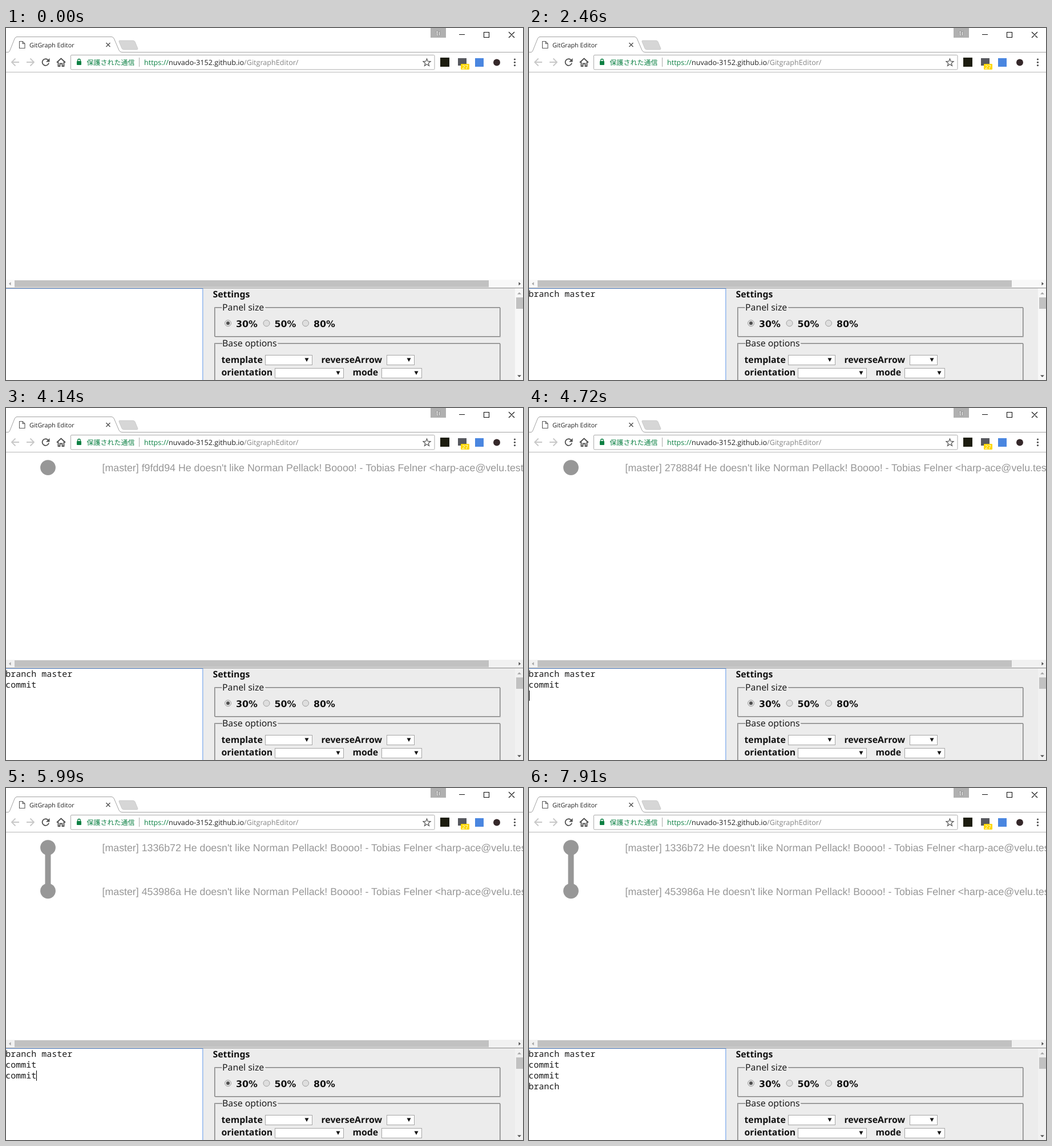
Write an HTML page that moves like this. It is 906 px wide and 618 px high and loops after 8000 ms.

```html
<!DOCTYPE html>
<html lang="ja">
<head>
<meta charset="utf-8">
<title>GitGraph Editor</title>
<style>
html, body { margin: 0; width: 100%; height: 100%; overflow: hidden; background: #fff; }
svg { display: block; width: 906px; height: 618px; }
text { text-rendering: geometricPrecision; white-space: pre; }
.ui { font-family: "Open Sans", "Noto Sans", sans-serif; }
.jp { font: 12px "Noto Sans CJK JP", "Noto Sans CJK", sans-serif; fill: #0b8043; }
.form { font: 15.8px "Noto Sans", sans-serif; fill: #1c1c1c; }
.bold { font-weight: 700; fill: #111; }
.num { font: 700 15.8px "DejaVu Sans", sans-serif; fill: #111; }
.code { font: 15px "Noto Sans Mono", monospace; fill: #1a1a1a; }
.log { font: 17.8px "Liberation Sans", Arial, sans-serif; fill: #979797; }
.icon { fill: none; stroke: #505050; stroke-width: 1.8; }
.pale { stroke: #c8c8c8; }
</style>
</head>
<body>
<svg id="stage" viewBox="0 0 906 618" xmlns="http://www.w3.org/2000/svg">
  <rect width="906" height="618" fill="#fff"/>

  <!-- tab strip and window buttons -->
  <path d="M0 42.5H4Q6 42 7 39L15 19Q16.5 15.5 19 15.5H185Q188 15.5 189.5 19L198 39Q199.5 42.5 203 42.5H906" fill="none" stroke="#a2a2a2"/>
  <path d="M199 22H222Q225 22 226 24L231 36Q231 38 229 38H207Q204 38 203 36L198 24Q197.5 22 199 22Z" fill="#d6d6d6" stroke="#c2c2c2" stroke-width=".7"/>
  <path d="M23.5 23.5H29L33 27.5V35.5H23.5ZM29 23.5V27.5H33" fill="#fff" stroke="#5a5a5a" stroke-width="1.1"/>
  <text class="ui" x="41" y="33.5" font-size="10.8" fill="#222">GitGraph Editor</text>
  <path d="M175.5 26L182.5 33M182.5 26L175.5 33" stroke="#555" stroke-width="1.5"/>
  <rect x="744" width="27" height="17" fill="#b0b0b0"/>
  <text class="ui" x="757.5" y="13" font-size="12" text-anchor="middle" fill="#fff" stroke="#808080" paint-order="stroke">ti</text>
  <path d="M794 11.5H804M837.5 7.5H846.5V16.5H837.5ZM881 7L891 17M891 7L881 17" fill="none" stroke="#111" stroke-width="1.1"/>

  <!-- toolbar -->
  <path d="M0 77.5H906" stroke="#b8b8b8"/>
  <path class="icon pale" d="M23 60H10.5M16.5 53.5L10 60L16.5 66.5M36 60H48.5M42.5 53.5L49 60L42.5 66.5"/>
  <path class="icon" d="M73.5 56A5.8 5.8 0 1 0 75 61.5"/>
  <path d="M76.5 53V59.5H70Z" fill="#505050"/>
  <path class="icon" d="M89 60.5L96.5 53.5L104 60.5M91.5 59.5V67H94.5V62.5H98.5V67H101.5V59.5"/>
  <rect x="113.5" y="47.5" width="637.5" height="25.5" rx="1.5" fill="#fff" stroke="#ababab"/>
  <rect x="124" y="58" width="8" height="7" rx="1" fill="#0b8043"/>
  <path d="M125.7 59V57A2.3 2.5 0 0 1 130.3 57V59" fill="none" stroke="#0b8043" stroke-width="1.3"/>
  <text class="jp" x="141.5" y="64.5">保護された通信</text>
  <path d="M233.5 52V68" stroke="#a8a8a8"/>
  <text class="ui" x="242" y="65" font-size="12.6" fill="#858585"><tspan fill="#0b8043">https://</tspan><tspan fill="#222">nuvado-3152.github.io</tspan>/GitgraphEditor/</text>
  <path id="star" fill="#fff" stroke="#555" stroke-width="1.2"/>
  <rect x="761" y="52" width="16" height="16" fill="#1d1d10"/>
  <rect x="792" y="53" width="15" height="13" fill="#57595f"/>
  <rect x="797" y="63" width="15" height="10" rx="1" fill="#fdd800"/>
  <text class="ui" x="804.5" y="71.5" font-size="9.5" text-anchor="middle" fill="#fff">27</text>
  <rect x="822" y="53" width="15" height="15" fill="#4a86e0"/>
  <circle cx="860" cy="60.5" r="6" fill="#35282a"/>
  <g fill="#505050"><circle cx="891.5" cy="55" r="1.6"/><circle cx="891.5" cy="60.3" r="1.6"/><circle cx="891.5" cy="65.6" r="1.6"/></g>

  <!-- commit graph -->
  <g id="graph">
    <path id="link" d="M73.5 104.6V180.8" stroke="#979797" stroke-width="10"/>
    <g id="top"><circle cx="73.5" cy="104.6" r="13.4" fill="#979797"/><text class="log" x="168.5" y="111"></text></g>
    <g id="low"><circle cx="73.5" cy="180.8" r="13.4" fill="#979797"/><text class="log" x="168.5" y="187.5"></text></g>
  </g>

  <!-- horizontal scrollbar -->
  <rect class="track" y="442" width="906" height="14"/>
  <rect x="15" y="443" width="831" height="12" fill="#c1c1c1"/>
  <path d="M8.5 446V452L5 449Z" fill="#a3a3a3"/>
  <path d="M898.5 446V452L902 449Z" fill="#505050"/>

  <!-- editor -->
  <rect y="457" width="345" height="161" fill="#fff"/>
  <rect x="345" y="457" width="547" height="161" fill="#ececec"/>
  <path d="M0 456.5H906" stroke="#8a8a8a"/>
  <path d="M0 457.5H344.8V618" fill="none" stroke="#79a8ee" stroke-width="1.2"/>
  <g id="code"></g>
  <rect id="caret" width="1" height="18" fill="#000"/>

  <!-- settings -->
  <text class="form bold" x="362.5" y="473">Settings</text>
  <g id="groove" fill="none">
    <path d="M378 490.5H365.5V541.5H865.5V490.5H454M379 553.5H365.5V619M865.5 619V553.5H476"/>
  </g>
  <text class="form" x="379" y="496">Panel size</text>
  <text class="form" x="379" y="559">Base options</text>
  <g id="form"></g>

  <!-- vertical scrollbar -->
  <rect class="track" x="892" y="457" width="14" height="161"/>
  <rect x="894" y="473" width="12" height="20" fill="#c1c1c1"/>
  <path d="M896 467.5H903L899.5 464Z" fill="#a3a3a3"/>
  <path d="M896 609.5H903L899.5 613Z" fill="#505050"/>
</svg>
<script>
const $ = id => document.getElementById(id);
const LOOP = 8000;

function add(parent, tag, attrs, text = '') {
  const el = document.createElementNS('http://www.w3.org/2000/svg', tag);
  for (const key in attrs) el.setAttribute(key, attrs[key]);
  el.textContent = text;
  parent.appendChild(el);
  return el;
}

// five-pointed bookmark star
$('star').setAttribute('d', 'M' + Array.from({ length: 10 }, (_, i) => {
  const r = i % 2 ? 2.9 : 6.8, a = i * Math.PI / 5;
  return `${737.5 + r * Math.sin(a)} ${60.8 - r * Math.cos(a)}`;
}).join('L') + 'Z');

// fieldset frames: a dark line with its lighter copy one pixel inside
const frame = $('groove').firstElementChild;
const shade = frame.cloneNode();
shade.setAttribute('transform', 'translate(1 1)');
shade.setAttribute('stroke', '#b4b4b4');
frame.setAttribute('stroke', '#858585');
$('groove').prepend(shade);

const form = $('form');
[['30%', 389], ['50%', 456.5], ['80%', 525]].forEach(([label, x], i) => {
  add(form, 'circle', { cx: x, cy: 518.3, r: 5.5, fill: '#dedede', stroke: '#a0a0a0' });
  if (!i) add(form, 'circle', { cx: x, cy: 518.3, r: 3, fill: '#505050' });
  add(form, 'text', { class: 'num', x: x + 14, y: 525 }, label);
});

[
  ['template', 377.5, 588, 454.5, 82],
  ['reverseArrow', 552.5, 588, 667.5, 48],
  ['orientation', 377.5, 610, 471.5, 120],
  ['mode', 607.5, 610, 658.5, 70],
].forEach(([label, x, y, left, width]) => {
  const top = y < 600 ? 574.5 : 597.5, end = left + width;
  add(form, 'text', { class: 'form bold', x, y }, label);
  add(form, 'rect', { x: left, y: top, width, height: 17, fill: '#fff', stroke: '#a6a6a6' });
  add(form, 'path', { d: `M${end - 13} ${top + 5}h7l-3.5 6.5z`, fill: '#111' });
});

const lines = [0, 1, 2, 3].map(i => add($('code'), 'text', { class: 'code', x: -0.8, y: 472 + 19 * i }));

// start, end, then the letters added by each evenly spaced key press
const bursts = [
  [500, 1220, ['b', 'r', 'a', 'n', 'ch', ' ']],
  [1490, 2030, ['m', 'a', 's', 'te', 'r']],
  [2760, 3580, ['\n', 'c', 'o', 'm', 'm', 'it']],
  [4720, 5150, ['\n', 'c', 'o', 'mm']],
  [5450, 5450, ['it']],
  [6690, 6930, ['\n', 'br', 'an']],
  [7210, 7510, ['c', 'h', ' ']],
];
const keys = bursts.flatMap(([from, to, parts]) =>
  parts.map((text, i) => ({ at: from + (to - from) * i / Math.max(1, parts.length - 1), text })));

const blinks = [[2460, 2760], [4140, 4720], [6270, 6690], [7910, LOOP]];

const message = hash =>
  `[master] ${hash} He doesn't like Norman Pellack! Boooo! - Tobias Felner <harp-ace@velu.test>`;

function show(id, on) {
  $(id).style.display = on ? '' : 'none';
}

function draw(t) {
  const typed = keys.filter(k => k.at <= t + 0.01).map(k => k.text).join('').split('\n');
  lines.forEach((line, i) => { line.textContent = typed[i] || ''; });

  const row = typed.length - 1, col = typed[row].length;
  $('caret').setAttribute('x', col && col < 7 ? 9 * col - 1 : 9 * col);
  $('caret').setAttribute('y', 458 + 19 * row);
  show('caret', t >= 500 && !blinks.some(([a, b]) => t >= a && t < b));

  const drawn = t >= 4140, linked = t >= 5990;
  show('graph', drawn);
  show('link', linked);
  show('low', linked);
  $('top').lastChild.textContent = message(linked ? '1336b72' : t >= 4720 ? '278884f' : 'f9fdd94');
  $('low').lastChild.textContent = message('453986a');
  document.querySelectorAll('.track').forEach(el => el.setAttribute('fill', drawn ? '#f1f1f1' : '#f8f8f8'));
}

const begin = performance.now();
function tick() {
  draw((performance.now() - begin) % LOOP);
  requestAnimationFrame(tick);
}
tick();
</script>
</body>
</html>
```
